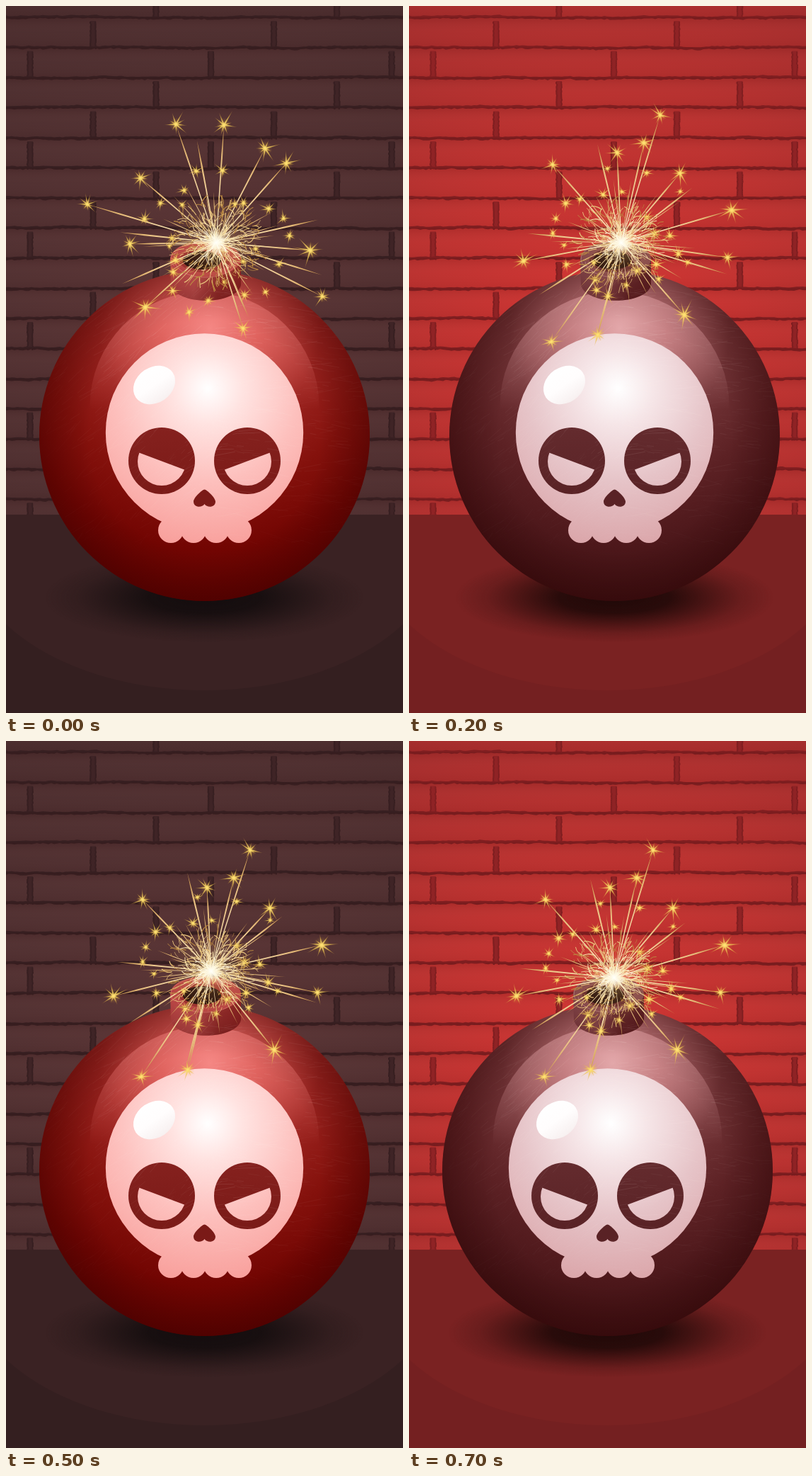
Recreate the animation shown at these times as an HTML page with a canvas. Size 561 by 998 pixels, loop 800 ms.

```html
<!DOCTYPE html>
<html lang="en">
<head>
<meta charset="utf-8">
<title>Bomb</title>
<style>
html, body { margin: 0; width: 100%; height: 100%; overflow: hidden; background: #3a2223; }
canvas { display: block; width: 561px; height: 998px; }
</style>
</head>
<body>
<canvas id="stage" width="561" height="998"></canvas>
<script>
const W = 561, H = 998, TAU = Math.PI * 2;
const FLOOR = 718, ROW = 42.5, CX = 280.5, STEP = 100;

const themes = {
  dark: {
    wall: ['#593334', '#4f2f30', '#462a2b'], mortar: '#371f21', joint: '#3f2426',
    floor: ['#3a2223', '#341f20'], shadow: '20,13,14',
    ball: ['#f08582', '#d4544f', '#9a221e', '#84110c', '#720502', '#620200'],
    eye: ['#85211e', '#7a1a17'],
    skull: ['#ffffff', '#ffe3e1', '#fdc0bd', '#f79793'],
    neck: ['#b84544', '#c25250', '#98302e', '#8a2423'], rim: '#b74443', edge: '#e07b77',
    gloss: '255,140,136'
  },
  red: {
    wall: ['#d23331', '#ba302e', '#9e2a2a'], mortar: '#7f1e20', joint: '#8f2325',
    floor: ['#7a2222', '#742021'], shadow: '32,9,8',
    ball: ['#dda4a6', '#b56d70', '#713336', '#5c2124', '#4c171a', '#3c0f11'],
    eye: ['#642b2e', '#592225'],
    skull: ['#ffffff', '#f6e6e8', '#e6c4c8', '#d89ea2'],
    neck: ['#7d4145', '#8a4d50', '#652a2d', '#5a2023'], rim: '#84474a', edge: '#c28a8a',
    gloss: '240,175,178'
  }
};

// longest sparks of each burst; the rest are seeded
const bursts = [
  { x: 297, seed: 11, tips: [[240, 167], [308, 168], [366, 201], [396, 222], [190, 243],
    [115, 280], [175, 336], [430, 345], [447, 410], [335, 455], [197, 425]] },
  { x: 285, seed: 23, tips: [[219, 210], [308, 203], [175, 247], [184, 322], [187, 377],
    [148, 387], [394, 263], [442, 299], [390, 386], [281, 440]] },
  { x: 290, seed: 37, tips: [[345, 154], [322, 193], [193, 224], [284, 207], [373, 236],
    [446, 288], [440, 355], [379, 436], [257, 464], [191, 474], [152, 360]] }
];
const shifts = [0, -10, 10, -5, 5, 0, 0, 0];
const order = [0, 1, 2, 1, 0, 2, 1, 2];

function random(seed) {
  return () => {
    seed = (seed + 0x6D2B79F5) | 0;
    let t = Math.imul(seed ^ (seed >>> 15), 1 | seed);
    t = (t + Math.imul(t ^ (t >>> 7), 61 | t)) ^ t;
    return ((t ^ (t >>> 14)) >>> 0) / 4294967296;
  };
}

function layer(paint) {
  const c = document.createElement('canvas');
  c.width = W;
  c.height = H;
  paint(c.getContext('2d'));
  return c;
}

function fillStops(f, colors, stops) {
  colors.forEach((c, i) => f.addColorStop(stops ? stops[i] : i / (colors.length - 1), c));
  return f;
}

function radial(g, x, y, r, colors, stops) {
  return fillStops(g.createRadialGradient(x, y, 0, x, y, r), colors, stops);
}

function linear(g, x0, y0, x1, y1, colors) {
  return fillStops(g.createLinearGradient(x0, y0, x1, y1), colors);
}

function oval(g, x, y, rx, ry, fill, turn = 0) {
  g.beginPath();
  g.ellipse(x, y, rx, ry, turn, 0, TAU);
  g.fillStyle = fill;
  g.fill();
}

function clipped(g, shape, paint) {
  g.save();
  g.beginPath();
  shape();
  g.clip();
  paint();
  g.restore();
}

function roughLine(g, y, rnd) {
  const low = [];
  let drift = 0;
  g.beginPath();
  for (let x = -4; x <= W + 4; x += 4) {
    drift = drift * 0.93 + (rnd() - 0.5) * 0.9;
    const mid = y + drift;
    g.lineTo(x, mid - 1.5 - rnd() * 0.9);
    low.push([x, mid + 1.3 + rnd() * 1.9]);
  }
  low.reverse().forEach(p => g.lineTo(...p));
  g.fill();
}

function paintRoom(g, th) {
  const rnd = random(5);
  clipped(g, () => g.rect(0, 0, W, FLOOR), () => {
    g.fillStyle = radial(g, CX, 430, 570, th.wall);
    g.fillRect(0, 0, W, FLOOR);
    for (let i = 0; i < 18; i++) {
      const top = 16 + ROW * (i - 1), bottom = top + ROW;
      g.fillStyle = linear(g, 0, top, 0, bottom,
        ['rgba(40,0,0,.10)', 'rgba(255,180,170,.025)', 'rgba(40,0,0,.05)']);
      g.fillRect(0, top, W, ROW);
      // joints move back by about a third of a brick per row
      for (let x = 212 - 89 * (i % 3); x < W + 10; x += 255.5) {
        g.fillStyle = th.joint;
        g.fillRect(x - 4, top + 5, 8, ROW - 5);
        g.fillStyle = th.mortar;
        for (let y = top + 6; y < bottom; y += 3) {
          g.fillRect(x - 4 - rnd(), y, 2.2, 3);
          g.fillRect(x + 2 + rnd(), y, 2, 3);
        }
      }
      g.fillStyle = th.mortar;
      roughLine(g, bottom, rnd);
    }
  });
  clipped(g, () => g.rect(0, FLOOR, W, H - FLOOR), () => {
    g.fillStyle = th.floor[1];
    g.fillRect(0, FLOOR, W, H - FLOOR);
    oval(g, CX, 760, 335, 206, th.floor[0]);
  });
}

function paintShadow(g, th) {
  g.translate(CX, 835);
  g.scale(1, 0.28);
  const shade = [1, 0.9, 0.5, 0.18, 0].map(a => `rgba(${th.shadow},${a})`);
  oval(g, 0, 0, 225, 225, radial(g, 0, 0, 225, shade, [0, 0.35, 0.6, 0.8, 1]));
}

function scratches(g) {
  const rnd = random(91);
  for (let i = 0; i < 1100; i++) {
    const x = 55 + rnd() * 450, y = 400 + rnd() * 360;
    const a = x < CX ? -0.95 + rnd() * 0.5 : 0.05 + (rnd() - 0.5) * 0.55;
    const n = 8 + rnd() * 30, fade = Math.max(0.15, 1 - Math.hypot(x - CX, y - 540) / 260);
    g.strokeStyle = `rgba(255,235,230,${0.26 * fade * rnd()})`;
    g.lineWidth = 0.6;
    g.beginPath();
    g.moveTo(x, y);
    g.lineTo(x + Math.cos(a) * n, y + Math.sin(a) * n);
    g.stroke();
  }
}

function paintNeck(g, th) {
  g.beginPath();
  g.moveTo(232, 356);
  g.lineTo(233, 394);
  g.bezierCurveTo(240, 423, 325, 423, 332, 394);
  g.lineTo(332, 356);
  g.closePath();
  g.fillStyle = linear(g, 232, 0, 332, 0, th.neck);
  g.fill();
  g.fillStyle = linear(g, 0, 365, 0, 417, ['rgba(60,0,0,0)', 'rgba(60,0,0,.3)']);
  g.fill();
  oval(g, 282, 357, 50, 25, th.rim);
  oval(g, 281, 359, 36, 17, th.neck[2]);
  oval(g, 277, 359, 27, 13, '#260e0b');
  g.strokeStyle = th.edge;
  g.globalAlpha = 0.65;
  g.beginPath();
  g.ellipse(282, 360, 43, 23, 0, 0.2, 3.1);
  g.stroke();
  g.beginPath();
  g.ellipse(282, 357, 49, 24, 0, 2.7, 4.7);
  g.stroke();
  g.globalAlpha = 1;
}

function paintSkull(g, th) {
  const bone = radial(g, 285, 540, 250, th.skull, [0, 0.2, 0.52, 1]);
  const eye = linear(g, 0, 595, 0, 690, th.eye);
  oval(g, CX, 602, 139.7, 139.7, bone);
  for (let i = 0; i < 4; i++) oval(g, 233 + i * 32, 740, 18, 18, bone);
  g.fillRect(233, 715, 96, 33);

  for (const side of [-1, 1]) {
    const x = CX + side * 60.5;
    oval(g, x, 642, 47, 47, eye);
    clipped(g, () => {
      g.moveTo(x + side * 40, 627.5);
      g.lineTo(x - side * 40, 657.5);
      g.lineTo(x - side * 40, 690);
      g.lineTo(x + side * 40, 690);
    }, () => oval(g, x, 643, 34, 34, bone));
  }

  g.beginPath();
  for (const side of [-1, 1]) {
    const at = d => CX + side * d;
    g.moveTo(CX, 682.5);
    g.bezierCurveTo(at(3), 682.5, at(15.5), 694, at(15.5), 699.5);
    g.bezierCurveTo(at(15.5), 708, at(4), 709, CX, 703);
  }
  g.fillStyle = th.eye[1];
  g.fill();
}

function paintBomb(g, th) {
  const body = () => g.arc(CX, 606.5, 233.5, 0, TAU);
  clipped(g, body, () => {
    g.fillStyle = radial(g, 288, 455, 390, th.ball, [0, 0.17, 0.4, 0.6, 0.8, 1]);
    g.fillRect(0, 360, W, 490);
    g.fillStyle = radial(g, CX, 606.5, 234,
      ['rgba(40,0,0,0)', 'rgba(40,0,0,0)', 'rgba(40,0,0,.32)'], [0, 0.7, 1]);
    g.fillRect(0, 360, W, 490);
    oval(g, CX, 565, 162, 162, linear(g, 0, 403, 0, 570,
      [0.44, 0.24, 0].map(a => `rgba(${th.gloss},${a})`)));
  });
  paintNeck(g, th);
  paintSkull(g, th);
  clipped(g, body, () => scratches(g));
  oval(g, 209.5, 535, 31.5, 25, linear(g, 192, 512, 225, 560,
    ['#fff', '#fffdfd', '#f6eeee']), -0.6);
}

function ray(g, x0, y0, x, y, width) {
  const a = Math.atan2(y - y0, x - x0) + Math.PI / 2;
  const mx = x0 + (x - x0) * 0.75, my = y0 + (y - y0) * 0.75;
  const dx = Math.cos(a) * width, dy = Math.sin(a) * width;
  g.fillStyle = linear(g, x0, y0, x, y, ['#fff6da', '#f7dfae', '#ecc586', '#c99248']);
  g.beginPath();
  g.moveTo(x0 + dx * 0.4, y0 + dy * 0.4);
  g.lineTo(mx + dx, my + dy);
  g.lineTo(x, y);
  g.lineTo(mx - dx, my - dy);
  g.lineTo(x0 - dx * 0.4, y0 - dy * 0.4);
  g.fill();
}

function star(g, x, y, size, rnd) {
  oval(g, x, y, size * 0.6, size * 0.6, radial(g, x, y, size * 0.6,
    ['rgba(255,214,90,.5)', 'rgba(240,185,60,.18)', 'rgba(240,180,60,0)']));
  const turn = rnd() * TAU;
  for (let i = 0; i < 9; i++) {
    const a = turn + i * TAU / 9 + (rnd() - 0.5) * 0.4;
    const n = size * (0.6 + rnd() * 0.8), w = 0.6 + size * 0.04;
    const tx = x + Math.cos(a) * n, ty = y + Math.sin(a) * n;
    const sx = -Math.sin(a) * w, sy = Math.cos(a) * w;
    g.fillStyle = linear(g, x, y, tx, ty,
      ['rgba(255,226,116,.9)', 'rgba(238,196,80,.7)', 'rgba(222,165,60,.2)']);
    g.beginPath();
    g.moveTo(x + sx, y + sy);
    g.lineTo(tx, ty);
    g.lineTo(x - sx, y - sy);
    g.fill();
  }
}

function hairs(g, cx, cy, rnd) {
  const hues = ['#fff8e2', '#f8e2ae', '#e9c47c', '#bd8b42'];
  for (let i = 0; i < 420; i++) {
    const a = rnd() * TAU, r = 60 * Math.pow(rnd(), 1.15), n = 5 + rnd() * 13;
    const x = cx + Math.cos(a) * r, y = cy + Math.sin(a) * r * 0.95;
    const bend = a + (rnd() - 0.5) * 1.1, end = bend + (rnd() - 0.5) * 1.6;
    g.strokeStyle = hues[Math.min(3, Math.floor(rnd() * 2 + r / 24))];
    g.lineWidth = 0.6 + rnd() * 0.7;
    g.beginPath();
    g.moveTo(x, y);
    g.quadraticCurveTo(x + Math.cos(bend) * n / 2, y + Math.sin(bend) * n / 2,
      x + Math.cos(end) * n, y + Math.sin(end) * n);
    g.stroke();
  }
}

function paintBurst(g, { x: cx, seed, tips }, cy) {
  const rnd = random(seed);
  oval(g, cx, cy, 62, 62, radial(g, cx, cy, 62,
    ['rgba(255,225,150,.4)', 'rgba(255,205,110,.12)', 'rgba(255,200,100,0)']));

  const around = (count, near, far, draw) => {
    for (let i = 0; i < count; i++) {
      const a = (i + rnd() * 0.9) / count * TAU, r = near + rnd() * (far - near);
      draw(cx + Math.cos(a) * r, cy + Math.sin(a) * r * 0.9);
    }
  };
  around(34, 55, 105, (x, y) => ray(g, cx, cy, x, y, 0.5));
  around(6, 120, 165, (x, y) => ray(g, cx, cy, x, y, 1.1));
  for (const [x, y] of tips) {
    ray(g, cx, cy, x, y, 1);
    star(g, x, y, 13 + rnd() * 7, rnd);
  }
  around(24, 48, 118, (x, y) => star(g, x, y, 7 + rnd() * 6, rnd));

  hairs(g, cx, cy, rnd);
  oval(g, cx, cy, 17, 17, radial(g, cx, cy, 17,
    ['rgba(255,255,250,1)', 'rgba(255,251,230,.6)', 'rgba(255,240,190,0)']));
}

const parts = {};
for (const name in themes) {
  parts[name] = [paintRoom, paintShadow, paintBomb].map(paint => layer(g => paint(g, themes[name])));
}

const scenes = shifts.map((dx, i) => layer(g => {
  const [room, shadow, bomb] = parts[i % 4 < 2 ? 'dark' : 'red'];
  g.drawImage(room, 0, 0);
  g.translate(dx, 0);
  g.drawImage(shadow, 0, 0);
  g.drawImage(bomb, 0, 0);
  paintBurst(g, bursts[order[i]], i % 4 === 1 ? 325 : 334);
}));

const view = document.getElementById('stage').getContext('2d');
const start = performance.now();

function show() {
  const t = Math.max(0, performance.now() - start);
  view.drawImage(scenes[Math.floor(t / STEP) % scenes.length], 0, 0);
  requestAnimationFrame(show);
}
show();
</script>
</body>
</html>
```
